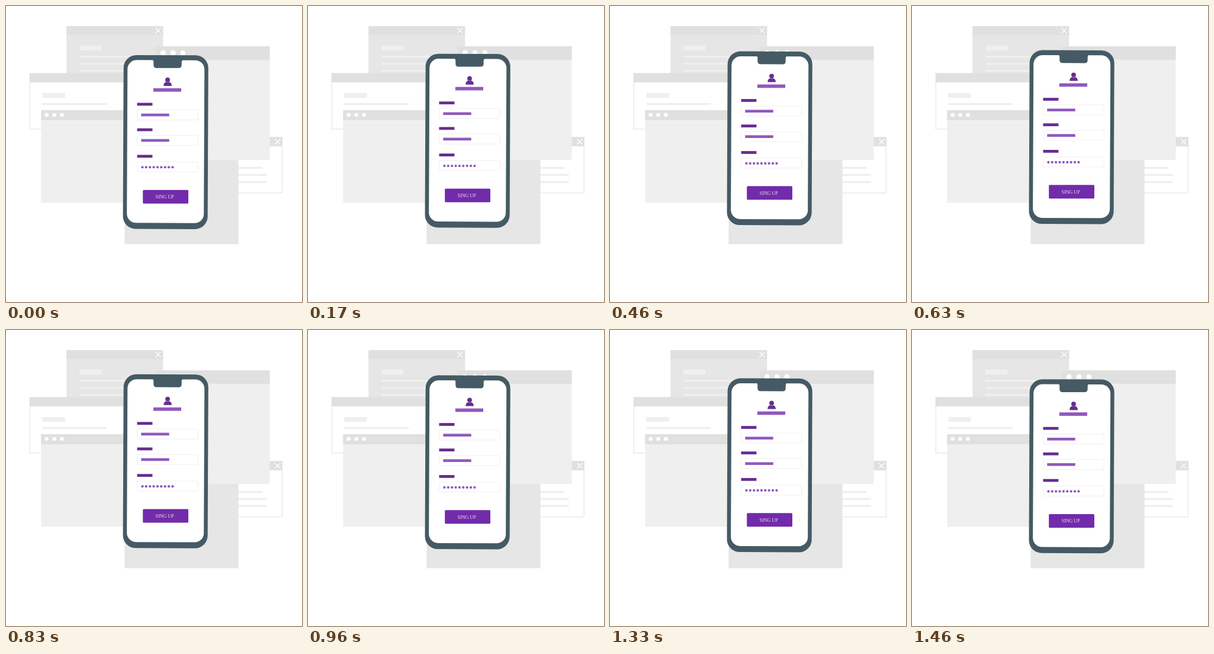
Write an HTML page that moves like this. It is 500x500 px and loops after 1500 ms.

```html
<!DOCTYPE html>
<html lang="en">
<head>
<meta charset="utf-8">
<title>Sign-up phone</title>
<style>
  html, body { margin: 0; width: 100%; height: 100%; overflow: hidden; background: #fff; }
  svg { display: block; width: 100vw; height: 100vh; }
  .head { fill: #e0e0e0; }
  .grey { fill: #e6e6e6; }
  .pale { fill: #efefef; }
  .white { fill: #fff; }
  .edge { fill: #fff; stroke: #e0e0e0; }
  .cross { stroke: #fff; stroke-width: 1.3; }
  .body { fill: #455a64; }
  .dark { fill: #662d91; }
  .light { fill: #9058bd; }
  .field { fill: #fff; stroke: #ebebeb; stroke-width: .8; }
  .button { fill: #722baa; }
  text { font: 8.1px "Liberation Serif", "Times New Roman", serif; fill: #eadff3; text-anchor: middle; }
</style>
</head>
<body>
<svg viewBox="0 0 500 500">
  <g id="windows"></g>
  <g id="phone"></g>
</svg>
<script>
const LOOP = 1500, FRAMES = 36;

const rect = (cls, x1, y1, x2, y2, r = 0) =>
  `<rect class="${cls}" x="${x1}" y="${y1}" width="${x2 - x1}" height="${y2 - y1}" rx="${r}"/>`;

const dots = (cls, n, x, y, gap, r) => Array.from({ length: n }, (_, i) =>
  `<circle class="${cls}" cx="${x + i * gap}" cy="${y}" r="${r}"/>`).join('');

const cross = (x, y) =>
  `<path class="cross" d="M${x - 4.5} ${y - 4.5}l9 9m0-9l-9 9"/>`;

const windows = [
  rect('grey', 102.3, 34, 265.3, 180),
  rect('head', 102.3, 34, 265.3, 49),
  cross(257, 41.5),
  rect('pale', 124, 67, 161.3, 75.3),
  ...[84, 96, 108].map(y => rect('pale', 124, y, 230, y + 3.5)),

  rect('edge', 40.3, 114, 203, 208),
  rect('head', 39.8, 113.5, 203, 129),
  rect('pale', 61.3, 147, 99.7, 155),
  rect('pale', 61.3, 163.8, 170, 167.3),

  rect('pale', 59.3, 176, 215, 332.3),
  rect('head', 59.3, 176, 215, 193),
  dots('white', 3, 68.6, 184, 12.9, 3.3),

  rect('edge', 340, 222, 466.3, 315.7),
  rect('head', 340, 221.4, 466.8, 237),
  cross(458.8, 229.3),
  rect('pale', 360, 271.8, 433.3, 275.2),
  ...[283.7, 295.6].map(y => rect('pale', 360, y, 440.5, y + 3.4)),

  rect('grey', 200.4, 210, 392.6, 402.4),

  rect('pale', 253, 68.2, 445.5, 260),
  rect('head', 253, 68.2, 445.5, 90.7),
  dots('white', 3, 265.3, 79.2, 16.8, 4.4)
];

const group = (y, content) =>
  rect('dark', 221.5, y, 247.4, y + 4.8) +
  rect('field', 221.5, y + 11.9, 324.2, y + 28.8, 1.5) + content;

const bar = y => rect('light', 228.3, y, 275.7, y + 4.6);

const phone = [
  '<g transform="rotate(.25 269.6 230.2)">',
  rect('body', 198.1, 83.4, 341.2, 377, 21.5),
  rect('white', 204.7, 91.8, 334.7, 366.8, 15.5),
  '<path class="body" d="M245 91q3.7 0 3.7 4v5q0 5 5 5h37.4q5 0 5-5v-5q0-4 3.7-4z"/>',
  '</g>',
  '<circle class="dark" cx="273" cy="125" r="3.9"/>',
  '<path class="dark" d="M266.2 135.2q0-5.4 4.6-6.6q2.2 1.4 4.4 0q4.8 1.2 4.8 6.6z"/>',
  rect('light', 248.9, 139.2, 296, 145),
  group(163.8, bar(182)),
  group(206.9, bar(225)),
  group(251.7, dots('light', 9, 230.4, 272.6, 6.38, 2.15)),
  rect('button', 231.2, 311, 308, 334, 1.5),
  '<text x="268.1" y="325.2">SING UP</text>'
];

document.getElementById('windows').innerHTML = windows.join('');
const device = document.getElementById('phone');
device.innerHTML = phone.join('');

// [time in ms, lift in px]
const steps = [
  [0, .25], [330, 4.7], [540, 7.9], [630, 8.7], [725, 9],
  [830, 8.5], [950, 6.8], [1080, 4.9], [1330, 1.7], [1460, 0], [1500, .25]
];

function lift(t) {
  const i = steps.findIndex(s => s[0] > t);
  const [t0, a] = steps[i - 1], [t1, b] = steps[i];
  return a + (b - a) * (t - t0) / (t1 - t0);
}

function draw() {
  const t = performance.now() % LOOP;
  const tick = Math.floor(t * FRAMES / LOOP + .15) % FRAMES;
  device.setAttribute('transform', `translate(0 ${-lift(tick * LOOP / FRAMES)})`);
  requestAnimationFrame(draw);
}
draw();
</script>
</body>
</html>
```
